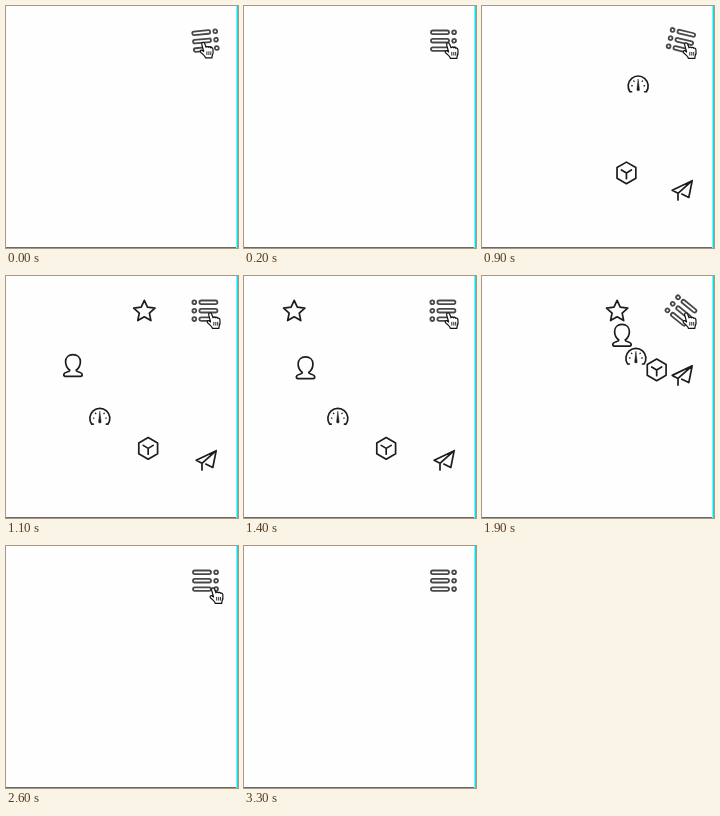
Animation of 232x242 px, one loop 3700 ms. Source, as an HTML page:

```html
<!DOCTYPE html>
<html lang="en">
<head>
<meta charset="utf-8">
<title>Radial menu</title>
<style>
  html, body { margin: 0; width: 100%; height: 100%; overflow: hidden; background: #fefefe; }
  svg { display: block; }
  .line { fill: none; stroke: #1c1c1c; stroke-width: 1.7; stroke-linejoin: round; stroke-linecap: round; }
  .menu { fill: none; stroke: #484848; stroke-width: 1.8; }
</style>
</head>
<body>
<svg width="232" height="242" viewBox="0 0 232 242">
  <rect y="241" width="230" height="1" fill="#6a6a6a"/>
  <rect x="230.5" width="1.5" height="242" fill="#06dfe8"/>

  <g class="line">
    <g class="item">
      <path d="M11 -9L-9 .6L-3.2 3.6L11 -9L7.6 7.8L.6 4.4M-3.2 3.6V10.3"/>
    </g>
    <g class="item">
      <path d="M0 -10.8L9.4 -5.4V5.4L0 10.8L-9.4 5.4V-5.4ZM0 0L-5 -3M0 0L5 -3M0 0V5.8"/>
    </g>
    <g class="item">
      <path d="M-6.6 8H-8.2A10 10 0 1 1 8.2 8H6.6"/>
      <path stroke-width="1.3" d="M-6.4 2h.5M6.4 2h-.5M-4.4 -2.8l.4 .4M4.4 -2.8l-.4 .4"/>
      <path d="M0 -4.4L1.2 5.2A1.3 1.3 0 1 1 -1.2 5.2Z" fill="#1c1c1c" stroke-width=".5"/>
    </g>
    <g class="item">
      <path d="M-3.2 4.8C-6.2 2.4 -7.4 -.6 -7.4 -3.8C-7.4 -8.2 -4.2 -10.8 0 -10.8S7.4 -8.2 7.4 -3.8C7.4 -.6 6.2 2.4 3.2 4.8C3.2 7 9.2 6 9.2 9.2Q9.2 11 6.5 11H-6.5Q-9.2 11 -9.2 9.2C-9.2 6 -3.2 7 -3.2 4.8Z"/>
    </g>
    <g class="item"><path id="star"/></g>
  </g>

  <circle cx="199.2" cy="34.7" r="16.5" fill="#fefefe"/>
  <g id="menu" class="menu"></g>

  <g id="hand" stroke="#111" stroke-width="1.2" stroke-linejoin="round" stroke-linecap="round">
    <path fill="#fff" d="M3 2.6C2.8 .4 5.4 .2 6 2L7.4 5.8C8 4.8 9.4 4.9 9.8 5.8C10.6 5 11.8 5.4 12.1 6.3C13 5.8 14.1 6.5 14.3 7.7C14.6 10 14.9 12 13.6 13.8L13.2 16.4H6.8C6.4 14.6 4.2 12.6 2.2 11C.8 9.6 2 8.2 3.4 8.8L5 10Z"/>
    <path fill="none" stroke-width=".9" d="M8.2 10.3V13.2M10.2 10.3V13.2M12.1 10.3V13.2"/>
  </g>
</svg>
<script>
  const LOOP = 3700, STEP = 100;
  const CENTER = { x: 199.2, y: 34.7 }, RADIUS = 149;
  const OPEN = 634, CLOSE = 1834, TURN = 400, SLIDE = 200;

  // Cursor positions: start time, x, y
  const CURSOR = [
    [0, 192.7, 35.5], [100, 197, 36], [200, 199.6, 36],
    [2500, 201, 38], [2600, 202.5, 41], [3200, 207, 50]
  ];
  const CURSOR_GONE = 3300;

  const $ = id => document.getElementById(id);
  const items = [...document.querySelectorAll('.item')];
  const place = (el, x, y) => el.setAttribute('transform', `translate(${x} ${y})`);

  $('star').setAttribute('d', 'M' + Array.from({ length: 10 }, (_, i) => {
    const r = i % 2 ? 5.3 : 11.2, a = (i * 36 - 90) * Math.PI / 180;
    return `${(r * Math.cos(a)).toFixed(2)} ${(r * Math.sin(a) + .8).toFixed(2)}`;
  }).join('L') + 'Z');

  $('menu').innerHTML = [-8.4, 0, 8.4].map(y =>
    `<rect x="-12.2" y="${y - 1.8}" width="18" height="3.6" rx="1.8"/>` +
    `<circle cx="10.9" cy="${y}" r="1.9"/>`).join('');

  // The CSS "ease" curve: cubic-bezier(.25, .1, .25, 1)
  function ease(x) {
    if (x <= 0) return 0;
    if (x >= 1) return 1;
    const curve = (a, b, s) => 3 * a * s * (1 - s) ** 2 + 3 * b * s * s * (1 - s) + s ** 3;
    let lo = 0, hi = 1;
    for (let i = 0; i < 24; i++) {
      const mid = (lo + hi) / 2;
      if (curve(.25, .25, mid) < x) lo = mid; else hi = mid;
    }
    return curve(.1, 1, lo);
  }

  const progress = (t, start, length) => ease((t - start) / length);

  function draw(t) {
    // The loop begins while an earlier close is still settling.
    const settling = 1 - progress(t, -312, TURN);
    const turn = settling + progress(t, OPEN, TURN) - progress(t, CLOSE, TURN);
    $('menu').setAttribute('transform',
      `translate(${CENTER.x} ${CENTER.y}) rotate(${-180 * turn})`);

    items.forEach((el, i) => {
      const out = progress(t, 650 + 100 * i, SLIDE) - progress(t, CLOSE, SLIDE);
      const a = (90 + 22.5 * i) * Math.PI / 180, d = RADIUS * out;
      place(el, CENTER.x + d * Math.cos(a), CENTER.y + d * Math.sin(a));
      el.style.visibility = out > .05 ? 'visible' : 'hidden';
    });

    const [, x, y] = CURSOR.filter(c => c[0] <= t).pop();
    place($('hand'), x, y);
    $('hand').style.visibility = t < CURSOR_GONE ? 'visible' : 'hidden';
  }

  const begin = performance.now();
  function tick() {
    const t = (performance.now() - begin) % LOOP;
    draw(Math.floor(t / STEP) * STEP);
    requestAnimationFrame(tick);
  }
  tick();
</script>
</body>
</html>
```
